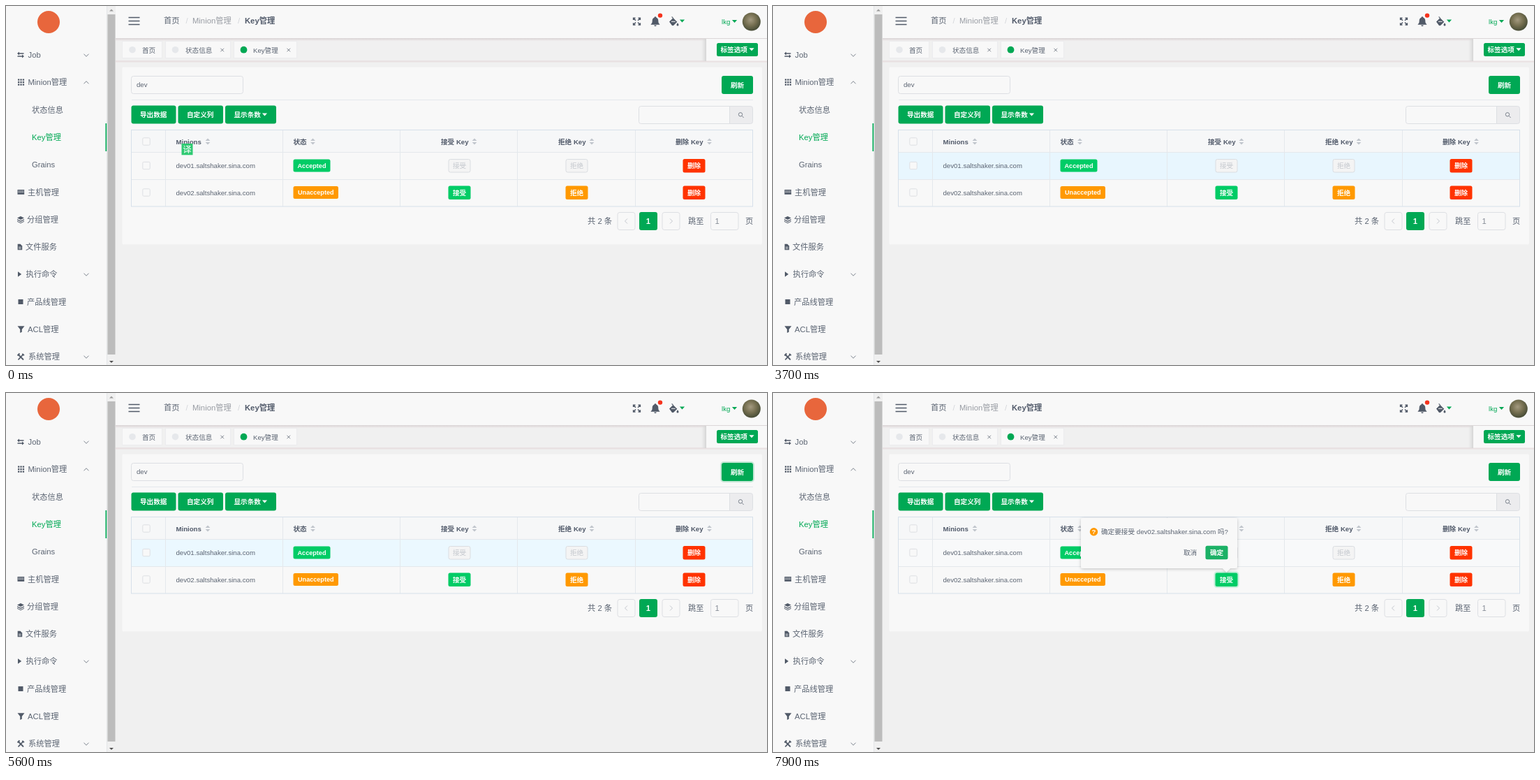
These frames come from a looping animation (1090x514 px, 8 s). An HTML page:

```html
<!DOCTYPE html>
<html lang="zh-CN">
<head>
<meta charset="utf-8">
<title>Key管理</title>
<style>
html,body{margin:0;width:100%;height:100%;overflow:hidden;background:#f0f0f0}
svg{display:block}
text{font:9.65px "Liberation Sans","Noto Sans CJK SC","Noto Sans CJK",sans-serif;fill:#5b6472}
.menu text,.mid{font-size:11.25px}
.b{font-weight:700;fill:#515a6a}
.w{font-weight:700;fill:#fff}
.c{text-anchor:middle}
.tag{font-size:9.1px}
.off{fill:#c3c7cd}
.g{fill:#00a854}
.ok{fill:#0c6}
.warn{fill:#f90}
.del{fill:#f30}
.ico{fill:#515a68}
.ln{fill:none;stroke:#515a68}
.box{fill:#f8f8f8;stroke:#dddfe3}
.dis{fill:#f4f4f4;stroke:#dadde1}
.rule{fill:none;stroke:#e4e8ec}
.arrow{fill:none;stroke:#7d848e}
.hov{fill:#fff;opacity:0}
.ring{fill:none;stroke-width:2;opacity:0}

.anim{animation:8s step-end infinite}
.row{fill:#f8f8f8;animation-name:row}
.tr{animation-name:translate}
.unacc{animation-name:unacc}
.find{animation-name:find}
.refresh{animation-name:refresh}
.focus1{animation-name:focus1}
.reject{animation-name:reject}
.accept{animation-name:accept}
.focus2{animation-name:focus2}
.pop{animation-name:pop}
.sure{animation-name:sure}
@keyframes row{
  0%{fill:#f8f8f8} 21.25%{fill:#f1f7fb} 22.5%{fill:#e8f6fe}
  48.75%{fill:#f0f9fe} 50%{fill:#f8fbfe} 70%{fill:#ebf8ff}
  81.25%{fill:#f2f9fe} 82.5%,100%{fill:#f8fbfe} 92.5%{fill:#f8f9fa}}
@keyframes translate{0%{opacity:1} 32.5%,100%{opacity:0}}
@keyframes unacc{0%{opacity:1} 21.25%{opacity:.92} 22.5%{opacity:.85} 23.75%,100%{opacity:1}}
@keyframes find{0%{stroke:#dddfe3} 51.25%{stroke:#8bcfaa} 52.5%{stroke:#33b977} 53.75%{stroke:#9cd5b5} 55%,100%{stroke:#dddfe3}}
@keyframes refresh{0%{opacity:0} 53.75%{opacity:.1} 55%{opacity:.19} 56.25%{opacity:.2} 63.75%{opacity:.13} 65%{opacity:.06} 66.25%,100%{opacity:0}}
@keyframes focus1{0%{opacity:0} 60%{opacity:.1} 61.25%{opacity:.2} 90%,100%{opacity:0}}
@keyframes reject{0%{opacity:0} 81.25%{opacity:.12} 82.5%{opacity:.18} 83.75%,100%{opacity:0}}
@keyframes accept{0%{opacity:0} 86.25%{opacity:.08} 87.5%{opacity:.17} 90%{opacity:.2} 96.25%{opacity:.1} 97.5%,100%{opacity:0}}
@keyframes focus2{0%{opacity:0} 90%,100%{opacity:.2}}
@keyframes pop{0%{opacity:0} 92.5%{opacity:.2} 93.75%{opacity:.55} 95%{opacity:.88} 96.25%,100%{opacity:1}}
@keyframes sure{0%{opacity:0} 98.75%,100%{opacity:.11}}
</style>
</head>
<body>
<svg width="1090" height="514" viewBox="0 0 1090 514">
<defs>
  <linearGradient id="under" x2="0" y2="1"><stop stop-color="#d9d3d4"/><stop offset="1" stop-color="#f0eeee"/></linearGradient>
  <linearGradient id="side"><stop stop-color="#ddd" stop-opacity="0"/><stop offset="1" stop-color="#d4d4d4"/></linearGradient>
  <radialGradient id="photo" cx=".45" cy=".4" r=".65"><stop stop-color="#a49a80"/><stop offset=".5" stop-color="#756f50"/><stop offset="1" stop-color="#3f4632"/></radialGradient>
  <filter id="soft" x="-10%" y="-20%" width="120%" height="150%"><feDropShadow dx="0" dy="1" stdDeviation="2" flood-opacity=".22"/></filter>
  <path id="caret" d="M-3.6-2H3.6L0 2z"/>
  <path id="chev" class="arrow" d="M-3.5-1.8L0 1.8 3.5-1.8"/>
  <path id="cross" class="arrow" stroke="#aaa" d="M-2.3-2.3L2.3 2.3M2.3-2.3L-2.3 2.3"/>
  <path id="sort" fill="#c0c5cc" d="M-3.4-1L0-4.6 3.4-1zM-3.4 1H3.4L0 4.6z"/>
  <rect id="check" class="box" x="-5.2" y="-5.2" width="10.4" height="10.4" rx="1.5"/>
  <rect id="small" width="32" height="19.5" rx="2.5"/>
  <rect id="smallbox" class="dis" x=".5" y=".5" width="31" height="18.5" rx="2.5"/>
  <rect id="pager" class="box" x=".5" y=".5" width="25" height="25" rx="3"/>
</defs>

<rect width="1090" height="514" fill="#f0f0f0"/>

<!-- sidebar -->
<g class="menu">
  <rect width="144" height="514" fill="#f8f8f8"/>
  <circle cx="61" cy="23" r="16" fill="#e8663c"/>
  <rect x="142.5" y="168" width="1.7" height="40" class="g"/>
  <path stroke="#e4e6e8" d="M144.5 0V168M144.5 208V514"/>
  <text x="31.5" y="74">Job</text>
  <text x="31.5" y="113">Minion管理</text>
  <text x="37" y="152.5">状态信息</text>
  <text x="37" y="191.5" class="g">Key管理</text>
  <text x="37" y="231">Grains</text>
  <text x="31" y="270.5">主机管理</text>
  <text x="30" y="309.5">分组管理</text>
  <text x="28" y="349">文件服务</text>
  <text x="28.5" y="388">执行命令</text>
  <text x="30" y="427.5">产品线管理</text>
  <text x="31" y="466.5">ACL管理</text>
  <text x="32" y="506">系统管理</text>
  <use href="#chev" x="115" y="70.5"/>
  <use href="#chev" transform="translate(115 109.5) scale(1 -1)"/>
  <use href="#chev" x="115" y="384.5"/>
  <use href="#chev" x="115" y="502.5"/>
  <g class="ico">
    <path d="M16 68l3-2.5v1.7h6.5v1.6H19v1.7zM26 72l-3-2.5v1.7h-6.5v1.6H23v1.7z"/>
    <path d="M17 104.5h2.3v2.3H17zM20.4 104.5h2.3v2.3h-2.3zM23.8 104.5h2.3v2.3h-2.3zM17 108h2.3v2.3H17zM20.4 108h2.3v2.3h-2.3zM23.8 108h2.3v2.3h-2.3zM17 111.4h2.3v2.3H17zM20.4 111.4h2.3v2.3h-2.3zM23.8 111.4h2.3v2.3h-2.3z"/>
    <path d="M16.5 263h9.7v6.8h-9.7z"/>
    <path d="M21 301l5 2.5-5 2.5-5-2.5zM16 305.2l5 2.4 5-2.4v1.3l-5 2.5-5-2.5zM16 307.8l5 2.4 5-2.4v1l-5 2.4-5-2.4z"/>
    <path d="M16.7 340.8h3.8l2.7 2.8v5.6h-6.5z"/>
    <path d="M17 380.2l5.2 3.8-5.2 3.8z"/>
    <rect x="17.5" y="420" width="7" height="7"/>
    <path d="M16.5 458.3h10l-3.7 4.8v3.7l-2.6 1.2v-4.9z"/>
  </g>
  <path stroke="#f8f8f8" stroke-dasharray="1 .8" d="M17.5 264.8h8M17.5 266.6h8"/>
  <path stroke="#f8f8f8" stroke-width=".8" d="M18 345.3h3.6M18 347.3h3.6"/>
  <path class="ln" stroke-width="1.8" d="M17.5 506.5l6.5-7M18 499.5l7 7M16.5 500.5l3-3M23.3 498l2.6 2.2"/>
</g>
<rect x="145" width="12" height="514" fill="#f0f0f0"/>
<rect x="145.5" y="12" width="11" height="487" fill="#bcbcbc"/>
<path fill="#9b9b9b" d="M148 7.5h6l-3-3z"/>
<path fill="#505050" d="M148 508h6l-3 3z"/>

<!-- header -->
<rect x="157" width="933" height="46" fill="#f8f8f8"/>
<path class="ln" stroke-width="1.6" d="M175.5 16.5h16M175.5 21.5h16M175.5 26.5h16"/>
<g class="mid">
  <text class="mid" x="226" y="25">首页</text>
  <text class="mid" x="257.5" y="25" style="fill:#d4d6da">/</text>
  <text class="mid" x="267" y="25" style="fill:#989ca3">Minion管理</text>
  <text class="mid" x="332" y="25" style="fill:#d4d6da">/</text>
  <text class="mid b" x="342" y="25">Key管理</text>
</g>
<path class="ln" stroke-width="1.5" d="M898.6 20v-2.8h2.9M905.5 17.2h2.9V20M908.4 24.2V27h-2.9M901.5 27h-2.9v-2.8M899 17.7l3 3M908 17.7l-3 3M908 26.5l-3-3M899 26.5l3-3"/>
<path class="ico" d="M930 15.3c1 0 1.4.6 1.4 1.3 2 .6 2.9 2.3 2.9 4.4 0 3 .6 4 2 5v.8h-12.600v-.8c1.400-1 2-2 2-5 0-2.100.9-3.800 2.900-4.400 0-.7.4-1.300 1.400-1.300zM928.300 27.600h3.400c-.2 1-.8 1.500-1.700 1.500s-1.500-.5-1.700-1.500z"/>
<circle cx="937" cy="13.600" r="3.200" fill="#f5331d"/>
<path class="ico" d="M950 22.500l5.500-5.500 5.800 5.700-5.300 5.300h-2zM954 15l2 2-.8.8-2-2zM962 24.200c.9 1.300 1.500 2 1.500 2.800a1.500 1.500 0 0 1-3 0c0-.8.6-1.500 1.500-2.800z"/>
<path stroke="#f8f8f8" d="M953 22.300h5.600"/>
<use href="#caret" class="g" x="968.500" y="21.500"/>
<text class="g" x="1025" y="25.500">lkg</text>
<use href="#caret" class="g" x="1043.500" y="22"/>
<circle cx="1067.800" cy="22.500" r="13" fill="url(#photo)"/>

<!-- open tabs -->
<rect x="157" y="46" width="933" height="4" fill="url(#under)"/>
<rect x="157" y="78" width="933" height="2.500" fill="#e9e1e2"/>
<g fill="#f8f8f8" stroke="#ececee">
  <rect x="166.500" y="50.500" width="57" height="24"/>
  <rect x="228.500" y="50.500" width="93" height="24"/>
  <rect x="326.500" y="50.500" width="90" height="24"/>
</g>
<circle cx="181" cy="62.700" r="4.800" fill="#e6e8eb"/>
<circle cx="242.500" cy="62.700" r="4.800" fill="#e6e8eb"/>
<circle cx="340.500" cy="62.700" r="4.900" class="g"/>
<text x="195" y="66.500">首页</text>
<text x="257" y="66.500">状态信息</text>
<text x="354" y="66.500">Key管理</text>
<use href="#cross" x="309.700" y="63"/>
<use href="#cross" x="404.800" y="63"/>
<rect x="996" y="47" width="7" height="32" fill="url(#side)"/>
<rect x="1003" y="47" width="87" height="31.500" fill="#f8f8f8"/>
<rect x="1018" y="53" width="59" height="19" rx="2.500" class="g"/>
<text class="w" x="1023.500" y="66">标签选项</text>
<use href="#caret" fill="#fff" x="1068" y="62.300"/>

<!-- panel -->
<rect x="166.500" y="87.500" width="916.500" height="254" rx="2" fill="#f8f8f8"/>
<rect class="box" x="179.500" y="100.500" width="160" height="25" rx="3"/>
<text x="187" y="116.300">dev</text>
<rect class="ring focus1 anim" stroke="#00a854" x="1024" y="99" width="47" height="28" rx="4"/>
<rect class="g" x="1025" y="100" width="45" height="26" rx="3"/>
<rect class="hov refresh anim" x="1025" y="100" width="45" height="26" rx="3"/>
<text class="w c" x="1047.500" y="116.500">刷新</text>
<path class="rule" d="M180 134.500H1070"/>
<g class="g">
  <rect x="179.500" y="142.500" width="64" height="26" rx="3"/>
  <rect x="246.500" y="142.500" width="64.500" height="26" rx="3"/>
  <rect x="314" y="142.500" width="73" height="26" rx="3"/>
</g>
<text class="w" x="192" y="159">导出数据</text>
<text class="w" x="259" y="159">自定义列</text>
<text class="w" x="326.500" y="159">显示条数</text>
<use href="#caret" fill="#fff" x="370.500" y="155.500"/>
<rect x="1030.500" y="143.500" width="39" height="25" rx="3" fill="#ececee" stroke="#dddfe3"/>
<path class="box find anim" d="M1036.500 143.500v25H909.500a3 3 0 0 1-3-3v-19a3 3 0 0 1 3-3z"/>
<circle class="arrow" cx="1052" cy="155.300" r="2.700"/>
<path class="arrow" d="M1054 157.300l2.700 2.700"/>

<!-- table -->
<rect x="180" y="178" width="890" height="32" fill="#f6f7f8"/>
<rect class="row anim" x="180" y="210" width="890" height="38"/>
<path class="rule" d="M180 209.500H1070M180 248.500H1070M228.500 178V287M396.500 178V287M564.500 178V287M732.500 178V287M901.500 178V287"/>
<rect x="179.500" y="177.500" width="890" height="109.500" fill="none" stroke="#d6e0ea"/>
<use href="#check" x="201" y="194"/>
<use href="#check" x="201" y="228.500"/>
<use href="#check" x="201" y="267"/>
<text class="b" x="243.500" y="197.500">Minions</text>
<text class="b" x="411.500" y="197.500">状态</text>
<text class="b" x="623" y="197.500">接受 Key</text>
<text class="b" x="791" y="197.500">拒绝 Key</text>
<text class="b" x="959" y="197.500">删除 Key</text>
<use href="#sort" x="289" y="194"/>
<use href="#sort" x="439.500" y="194"/>
<use href="#sort" x="671" y="194"/>
<use href="#sort" x="839" y="194"/>
<use href="#sort" x="1007.500" y="194"/>

<text x="243.500" y="232">dev01.saltshaker.sina.com</text>
<rect class="ok" x="411.500" y="219.500" width="53" height="18" rx="2.500"/>
<text class="w c tag" x="438" y="231.800">Accepted</text>
<use href="#smallbox" x="633.500" y="219"/>
<text class="off c" x="649.500" y="232.300">接受</text>
<use href="#smallbox" x="801.500" y="219"/>
<text class="off c" x="817.500" y="232.300">拒绝</text>
<use href="#small" class="del" x="969.500" y="219"/>
<text class="w c" x="985.500" y="232.300">删除</text>

<text x="243.500" y="270.500">dev02.saltshaker.sina.com</text>
<g class="unacc anim">
  <rect class="warn" x="411.500" y="258" width="64.500" height="18" rx="2.500"/>
  <text class="w c tag" x="443.800" y="270.300">Unaccepted</text>
</g>
<rect class="ring focus2 anim" stroke="#0c6" x="632.500" y="256.500" width="34" height="21.500" rx="3.500"/>
<use href="#small" class="ok" x="633.500" y="257.500"/>
<use href="#small" class="hov accept anim" x="633.500" y="257.500"/>
<text class="w c" x="649.500" y="270.800">接受</text>
<use href="#small" class="warn" x="801.500" y="257.500"/>
<use href="#small" class="hov reject anim" x="801.500" y="257.500"/>
<text class="w c" x="817.500" y="270.800">拒绝</text>
<use href="#small" class="del" x="969.500" y="257.500"/>
<text class="w c" x="985.500" y="270.800">删除</text>

<!-- pagination -->
<text class="mid" x="833" y="312">共 2 条</text>
<use href="#pager" x="875.500" y="295"/>
<use href="#pager" x="939.500" y="295"/>
<rect class="g" x="907" y="295" width="26" height="26" rx="3"/>
<text class="mid w c" x="920" y="312">1</text>
<path fill="none" stroke="#c4c8ce" d="M890 304.500l-3.500 3.500 3.500 3.500M951 304.500l3.500 3.500-3.500 3.500"/>
<text class="mid" x="977" y="311.500">跳至</text>
<rect class="box" x="1009.500" y="295.500" width="39.500" height="25" rx="3"/>
<text class="mid" x="1015.500" y="312" style="fill:#858b95">1</text>
<text class="mid" x="1059" y="311.500">页</text>

<!-- translate badge -->
<g class="tr anim">
  <rect x="251.500" y="197" width="16" height="16.300" fill="#2fca72"/>
  <text class="c" x="259.500" y="209.800" style="font-size:12.500px;fill:#fff">译</text>
</g>

<!-- confirm popover -->
<g class="pop anim">
  <path filter="url(#soft)" fill="#f8f8f8" d="M444 179h218a3 3 0 0 1 3 3v66a3 3 0 0 1-3 3h-7l-5.500 5.500-5.500-5.500H444a3 3 0 0 1-3-3v-66a3 3 0 0 1 3-3z"/>
  <circle class="warn" cx="459.500" cy="198.800" r="5.700"/>
  <text class="w c" x="459.500" y="202.200">?</text>
  <text x="470" y="202.300">确定要接受 dev02.saltshaker.sina.com 吗?</text>
  <text class="c" x="597.500" y="232.300">取消</text>
  <use href="#small" class="g" x="619.500" y="218.800"/>
  <use href="#small" class="hov sure anim" x="619.500" y="218.800"/>
  <text class="w c" x="635.500" y="232.300">确定</text>
</g>
</svg>
</body>
</html>
```
